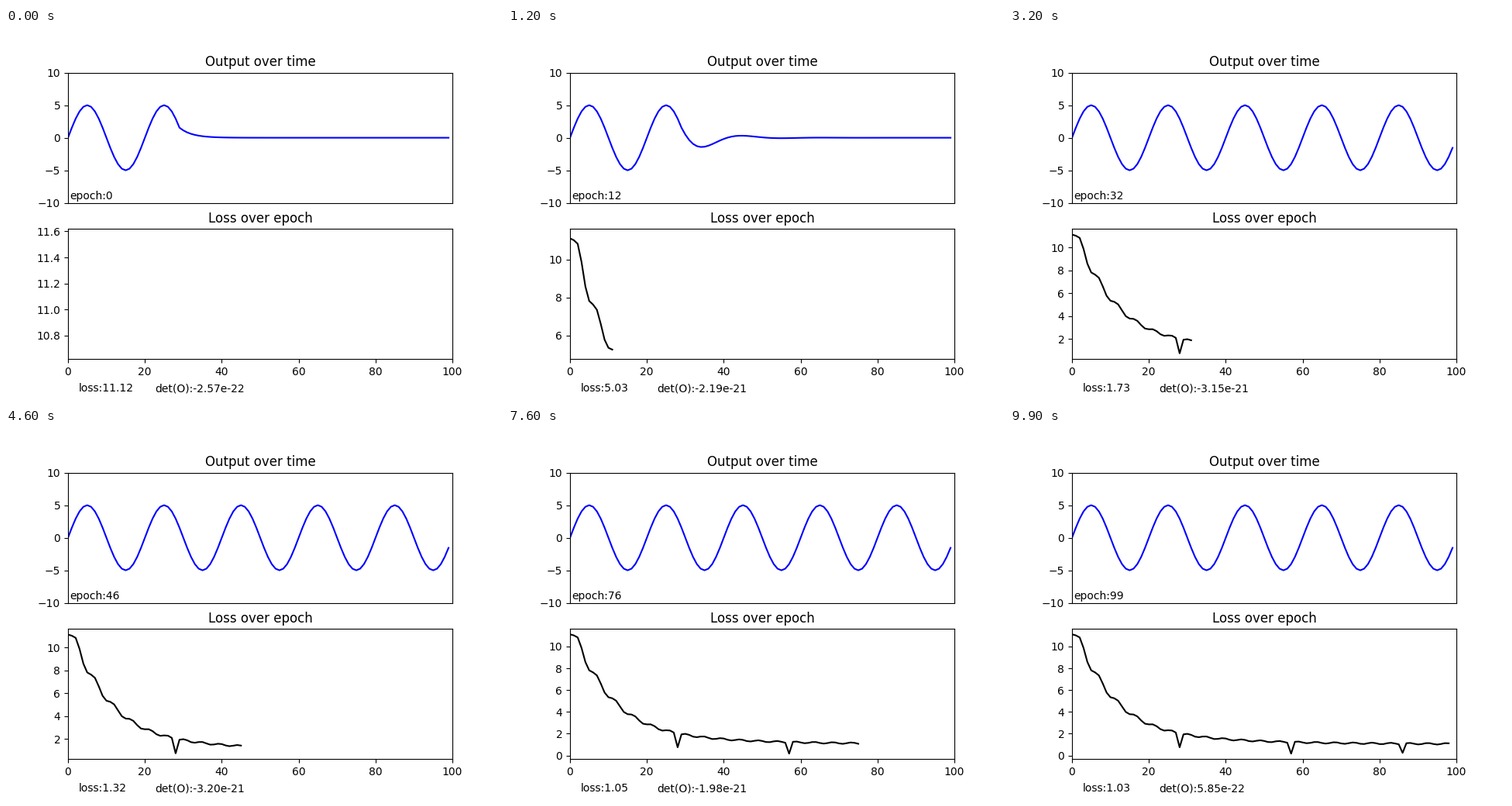
Animation of 640x480 px, one loop 10000 ms. Source, as a matplotlib script:

```python
import numpy as np
import matplotlib.pyplot as plt
from matplotlib.animation import FuncAnimation

EPOCHS = 100
STEPS = np.arange(100)
FORCED = 29          # last step driven by the teacher signal
CYCLE = 29           # epochs between sudden drops of the loss
LEARNED = 21         # epoch at which the output matches the teacher
OMEGA = np.pi / 10

DROPS = (0.75, 0.17, 0.24)

# (epoch, determinant of O in units of 1e-22)
DET_POINTS = [(0, -2.57), (12, -21.9), (21, -28.2), (46, -32.0),
              (65, -26.7), (86, -10.7), (99, 5.85)]
det_x, det_y = np.array(DET_POINTS).T
DET_POLY = np.polyfit(det_x / 100, det_y, len(DET_POINTS) - 1)


def loss_at(epoch):
    if epoch % CYCLE == CYCLE - 1:
        return DROPS[epoch // CYCLE]
    slow = 2.836 * np.exp(-epoch / 20.66)
    fast = 7.898 * np.exp(-(epoch / 9.6) ** 1.15)
    lag = 1.55 / (1 + np.exp((epoch - 28) / 4))
    size = 0.07 + 0.6 * np.exp(-epoch / 9)
    ripple = size * np.cos(2 * np.pi * (epoch - 39.4 - lag) * 6 / CYCLE)
    return 1.045 + slow + fast + ripple


def det_at(epoch):
    return np.polyval(DET_POLY, epoch / 100) * 1e-22


def output_at(epoch):
    s = min(epoch / LEARNED, 1)
    decay = 0.73 + 0.27 * s ** 1.25
    speed = OMEGA * (1 - (1 - s) ** 4)
    swing = 5 * np.cos(OMEGA) * s ** 0.8
    wave = 5 * np.sin(OMEGA * STEPS)
    n = STEPS[FORCED:] - FORCED
    wave[FORCED:] = decay ** n * (wave[FORCED] * np.cos(speed * n)
                                  - swing * np.sin(speed * n))
    return wave


LOSSES = np.array([loss_at(e) for e in range(EPOCHS)])

fig, (top, bottom) = plt.subplots(2, 1, figsize=(6.4, 4.8), dpi=100)

top.set_title("Output over time")
top.set_xlim(0, 100)
top.set_ylim(-10, 10)
top.set_xticks([])
output_line, = top.plot([], [], "b")
epoch_text = top.text(0.5, -9.5, "")

bottom.set_title("Loss over epoch")
bottom.set_xlim(0, 100)
loss_line, = bottom.plot([], [], "k")
loss_text = bottom.text(0.027, -0.25, "", transform=bottom.transAxes)
det_text = bottom.text(0.227, -0.25, "", transform=bottom.transAxes)


def update(epoch):
    output_line.set_data(STEPS, output_at(epoch))
    epoch_text.set_text(f"epoch:{epoch}")

    loss_line.set_data(np.arange(epoch), LOSSES[:epoch])
    seen = LOSSES[:max(epoch, 1)]
    bottom.set_ylim(seen.min() - 0.5, seen.max() + 0.5)
    loss_text.set_text(f"loss:{LOSSES[epoch]:.2f}")
    det_text.set_text(f"det(O):{det_at(epoch):.2e}")
    return output_line, epoch_text, loss_line, loss_text, det_text


anim = FuncAnimation(fig, update, frames=EPOCHS, interval=100,
                     init_func=lambda: update(0), repeat=True, repeat_delay=0)
plt.show()
```
